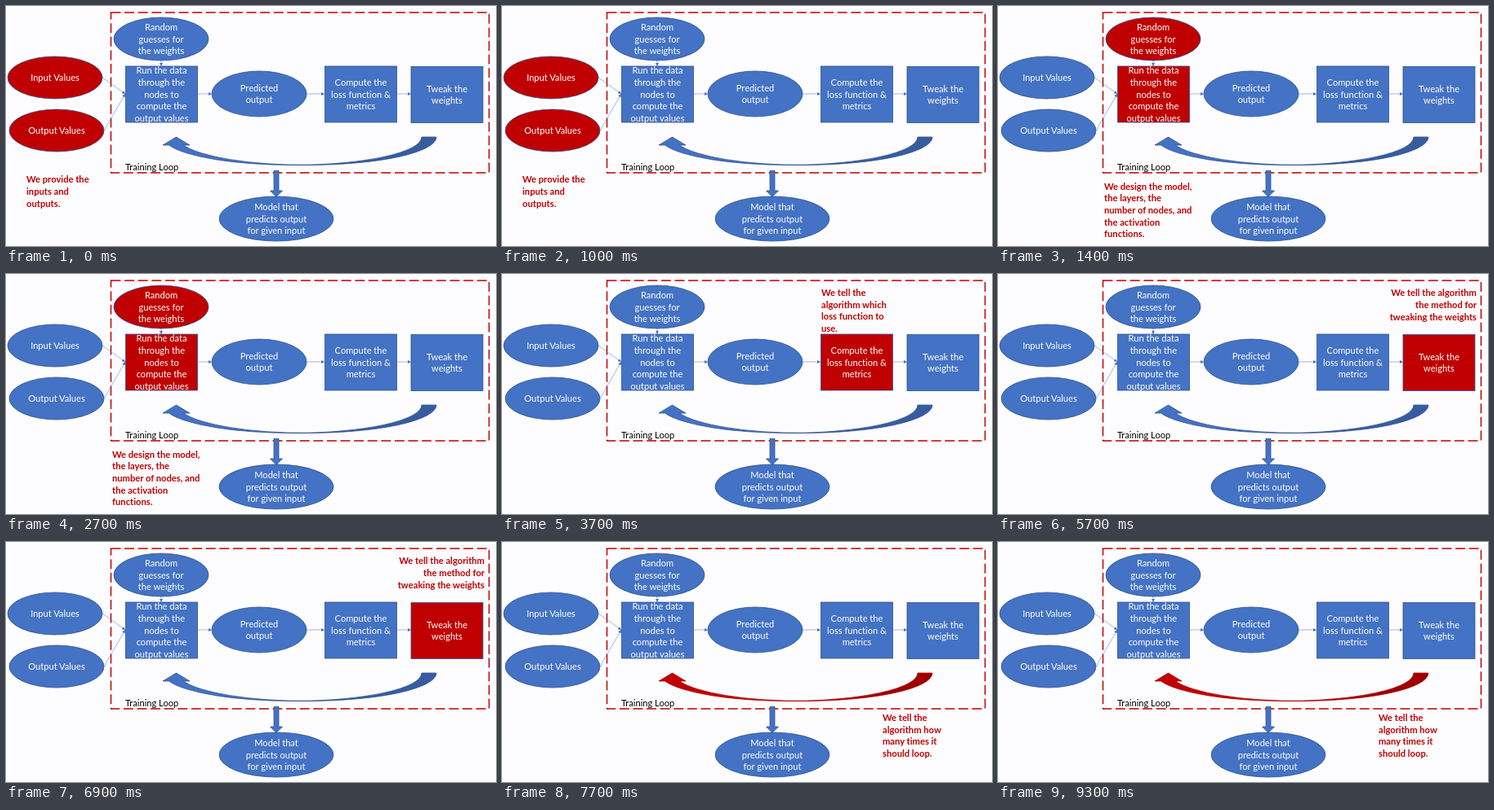
An HTML page that plays this animation: 600 px wide and 295 px high, repeating every 9.4 s.

```html
<!DOCTYPE html>
<html lang="en">
<head>
<meta charset="utf-8">
<title>Training loop</title>
<style>
  html, body { margin: 0; width: 100%; height: 100%; overflow: hidden; background: #fdfdff; }
  svg { display: block; width: 600px; height: 295px; font: 11.1px Lato, sans-serif; font-variant-ligatures: none; }
  .node { fill: #4472c4; stroke: #2f528f; stroke-width: .8; }
  .tail { fill: #375ca0; }
  .on .node { fill: #c00000; }
  .on .tail { fill: #9c0000; }
  .on .loop { stroke: #b00000; }
  .label { fill: #fff; text-anchor: middle; }
  .note { fill: #c00000; font-weight: bold; font-size: 11.2px; visibility: hidden; }
  .note.on { visibility: visible; }
  .link { stroke: #4472c4; stroke-width: .5; marker-end: url(#tip); }
</style>
</head>
<body>
<svg id="stage" viewBox="0 0 600 295">
  <defs>
    <marker id="tip" viewBox="0 0 4 4" refX="4" refY="2" markerWidth="4" markerHeight="4"
            markerUnits="userSpaceOnUse" orient="auto"><path d="M0 0L4 2L0 4Z" fill="#4472c4"/></marker>
  </defs>
  <rect x="128.5" y="8" width="463" height="197" fill="none" stroke="#c00000"
        stroke-width="1.5" stroke-dasharray="12 4.6"/>
  <path class="node" d="M328 202.5H334V227H338.5L331 234.5L323.5 227H328Z"/>
  <g data-step="4">
    <path class="node loop tail" d="M369 195.5A158 34.5 0 0 0 527 161H509A158 34.5 0 0 1 351 195.5Z"/>
    <path class="node loop" d="M351 195.5A158 34.5 0 0 1 199.5 171H192L208.5 161L225 171H217.5A158 34.5 0 0 0 369 195.5Z"/>
  </g>
  <text x="146" y="202">Training Loop</text>
</svg>
<script>
const stage = document.getElementById('stage');
const LOOP = 9400;
const SWITCHES = [1400, 3400, 5400, 7400];
const LINE_HEIGHT = 14.6;

function add(parent, tag, attrs, text = '') {
  const el = document.createElementNS('http://www.w3.org/2000/svg', tag);
  for (const key in attrs) el.setAttribute(key, attrs[key]);
  el.textContent = text;
  return parent.appendChild(el);
}

// Each line is placed by the vertical centre of the whole block
function addLines(parent, x, cy, text, attrs) {
  const lines = text.split('|');
  lines.forEach((line, i) => add(parent, 'text',
    { x, y: cy + 4 + (i - (lines.length - 1) / 2) * LINE_HEIGHT, ...attrs }, line));
}

function addNode(shape, cx, cy, rx, ry, text, step = -1) {
  const group = add(stage, 'g', { 'data-step': step });
  const size = shape === 'ellipse' ? { cx, cy, rx, ry }
    : { x: cx - rx, y: cy - ry, width: 2 * rx, height: 2 * ry };
  add(group, shape, { class: 'node', ...size });
  addLines(group, cx, cy, text, { class: 'label' });
}

function addNote(step, x, cy, text, anchor = 'start') {
  const group = add(stage, 'g', { class: 'note', 'data-step': step, 'text-anchor': anchor });
  addLines(group, x, cy, text);
}

addNode('ellipse', 60, 88, 58, 26, 'Input Values', 0);
addNode('ellipse', 62, 153, 58, 26, 'Output Values', 0);
addNode('ellipse', 190, 40.5, 58, 26.5, 'Random|guesses for|the weights', 1);
addNode('rect', 190.5, 108.5, 44, 34.5, 'Run the data|through the|nodes to|compute the|output values', 1);
addNode('ellipse', 310, 108, 58, 28, 'Predicted|output');
addNode('rect', 434.5, 108.5, 44, 34.5, 'Compute the|loss function &|metrics', 2);
addNode('rect', 540, 109, 44, 34.5, 'Tweak the|weights', 3);
addNode('ellipse', 331, 261.5, 70, 27.5, 'Model that|predicts output|for given input');

for (const [x1, y1, x2, y2] of [
  [118, 88, 146, 108], [120, 153, 146, 108], [190, 67, 190, 74],
  [235, 108, 252, 108], [368, 108, 390, 108], [479, 108, 496, 108]
]) add(stage, 'line', { class: 'link', x1, y1, x2, y2 });

addNote(0, 25, 228, 'We provide the|inputs and|outputs.');
addNote(1, 130, 251, 'We design the model,|the layers, the|number of nodes, and|the activation|functions.');
addNote(2, 391, 45, 'We tell the|algorithm which|loss function to|use.');
addNote(3, 586, 38, 'We tell the algorithm|the method for|tweaking the weights', 'end');
addNote(4, 466, 238, 'We tell the|algorithm how|many times it|should loop.');

const parts = document.querySelectorAll('[data-step]');

function draw(now) {
  const t = now % LOOP;
  const step = SWITCHES.filter(s => t >= s).length;
  for (const part of parts) part.classList.toggle('on', +part.dataset.step === step);
  requestAnimationFrame(draw);
}
draw(performance.now());
</script>
</body>
</html>
```
